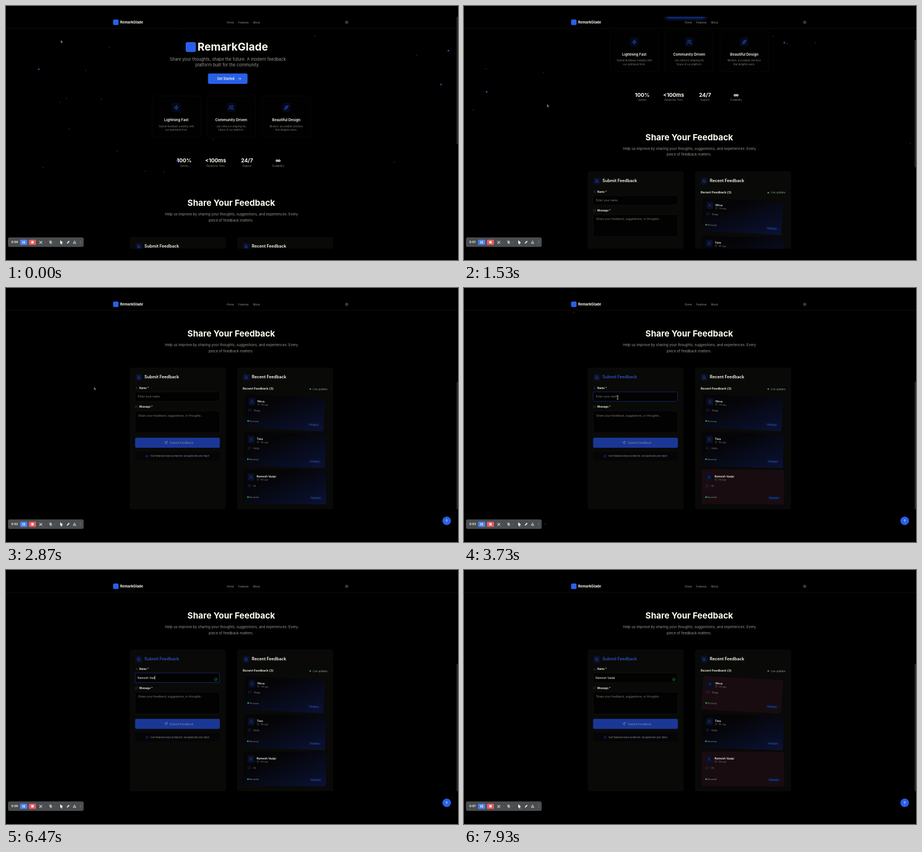
Animation, 800 px wide and 450 px high, one loop 8 s. Source, as an HTML page:

```html
<!DOCTYPE html>
<html lang="en">
<head>
<meta charset="utf-8">
<title>Feedback page</title>
<style>
html, body { margin: 0; width: 100%; height: 100%; overflow: hidden; background: #000; }
svg { display: block; width: 100vw; height: 100vh; }
text { font-family: Inter, "Open Sans", sans-serif; white-space: pre; }
</style>
</head>
<body>
<svg id="stage" viewBox="0 0 800 450"></svg>
<script>
const LOOP = 8000;
const BRIGHT = '#fcfcf0', MID = '#96968f', DIM = '#7f7f7c';
const BLUE = '#2860e8', SOFT_BLUE = '#2b56c4', NAVY = '#0a1028', GREEN = '#2fc45a';
const BRAND = 'RemarkGlade', PERSON = 'Ramesh Vadal';
const stage = document.getElementById('stage');

// Markup helpers; text is placed by its vertical middle.
const text = (x, y, s, size, fill = BRIGHT, weight = 400, anchor = 'start', extra = '') =>
  `<text x="${x}" y="${y + size * 0.36}" font-size="${size}" fill="${fill}" font-weight="${weight}" text-anchor="${anchor}" ${extra}>${s.replace('<', '&lt;')}</text>`;
const mid = (x, y, s, size, fill, weight) => text(x, y, s, size, fill, weight, 'middle');
const rect = (x, y, w, h, r, fill, extra = '') =>
  `<rect x="${x}" y="${y}" width="${w}" height="${h}" rx="${r}" fill="${fill}" ${extra}/>`;
const dot = (x, y, r, fill) => `<circle cx="${x}" cy="${y}" r="${r}" fill="${fill}"/>`;
const group = (id, body, extra = '') => `<g id="${id}" ${extra}>${body}</g>`;

const ICONS = {
  bolt: 'M13 2 3 14h9l-1 8 10-12h-9z',
  users: 'M2 21v-2a4 4 0 0 1 4-4h6a4 4 0 0 1 4 4v2M9 3a4 4 0 1 0 .1 0M22 21v-2a4 4 0 0 0-3-4M16 3a4 4 0 0 1 0 8',
  spark: 'M12 4l2 6 6 2-6 2-2 6-2-6-6-2 6-2zM19 2v5M16.500 4.500h5M5 17v4M3 19h4',
  user: 'M12 3a4 4 0 1 0 .1 0M4 21a8 8 0 0 1 16 0',
  chat: 'M3 4h18v13H8l-5 4z',
  clock: 'M12 2a10 10 0 1 0 .1 0M12 6v6l4 2',
  send: 'M22 2 2 9l8 4 4 9zM22 2 10 13',
  check: 'M12 2a10 10 0 1 0 .1 0M7 12l4 4 6-8',
  right: 'M3 12h18M14 5l7 7-7 7',
  up: 'M12 21V3M5 10l7-7 7 7',
  sun: 'M12 7a5 5 0 1 0 .1 0M12 1v3M12 20v3M1 12h3M20 12h3M4 4l2 2M18 18l2 2M4 20l2-2M18 6l2-2',
  page: 'M6 2h9l5 5v15H6zM9 12h7M9 17h7',
  off: 'M5 18 17 5l3 3L8 20zM3 4l18 18',
  mic: 'M12 2v11M8 4v7a4 4 0 0 0 8 0V4M5 11a7 7 0 0 0 14 0M12 18v4M4 4l17 17',
  down: 'M5 9l7 7 7-7',
  pen: 'M4 20l2-6L17 3l4 4L10 18z',
  mark: 'M3 21h18L12 3zM8 15h8'
};
const icon = (name, x, y, size, color, w = 2, fill = 'none') =>
  `<path transform="translate(${x - size / 2} ${y - size / 2}) scale(${size / 24})" d="${ICONS[name]}" fill="${fill}" stroke="${color}" stroke-width="${w}" stroke-linecap="round" stroke-linejoin="round"/>`;

const FIELD_LINE = 'stroke="#191916" stroke-width=".5"';
const panel = x => rect(x, 409, 170, 251, 4, '#090907');

function hero() {
  const features = [
    [301.5, 'bolt', 'Lightning Fast', 'Submit feedback instantly with', 'our optimized form.'],
    [398.5, 'users', 'Community Driven', 'Join others in shaping the', 'future of our platform.'],
    [496, 'spark', 'Beautiful Design', 'Modern, accessible interface', 'that delights users.']
  ];
  const stats = [[315.5, '100%', 'Uptime'], [371, '<100ms', 'Response Time'],
    [426.5, '24/7', 'Support'], [481.5, '∞', 'Scalability']];
  return rect(318, 64, 18, 17.5, 3, BLUE) + text(339, 72.5, BRAND, 19, BRIGHT, 700) +
    mid(392.5, 94.2, 'Share your thoughts, shape the future. A modern feedback', 7.4, MID) +
    mid(392, 104.4, 'platform built for the community.', 7.4, MID) +
    rect(357.5, 119.5, 70, 18.5, 3, BLUE) +
    text(374, 128.8, 'Get Started', 5.5, BRIGHT, 600) + icon('right', 413.5, 128.8, 5.5, BRIGHT, 2.6) +
    features.map(([x, ico, title, a, b]) =>
      rect(x - 43, 159.5, 86, 73, 3, '#010101', 'stroke="#0e0e0d" stroke-width=".6"') +
      rect(x - 8, 171, 16, 17, 4, '#050816') + icon(ico, x, 180, 9.5, BLUE) +
      mid(x, 202, title, 6.3, BRIGHT, 600) + mid(x, 213, a, 4.3, DIM) + mid(x, 219.6, b, 4.3, DIM)).join('') +
    stats.map(([x, v, l]) => mid(x, 274, v, 9.4, BRIGHT, 700) + mid(x, 283, l, 4.4, DIM)).join('') +
    mid(398.7, 349, 'Share Your Feedback', 15, BRIGHT, 700) +
    mid(399, 369, 'Help us improve by sharing your thoughts, suggestions, and experiences. Every', 6.26, MID) +
    mid(398.5, 379.3, 'piece of feedback matters.', 6.26, MID);
}

function formCard() {
  return panel(219) +
    rect(229, 420, 12, 12.5, 3, NAVY) + icon('page', 235, 426, 6, SOFT_BLUE) +
    text(245, 425.7, 'Submit Feedback', 7.3, BRIGHT, 600, 'start', 'id="formTitle"') +
    group('fields',
      icon('user', 231, 445.3, 4.5, '#3a5c9c') + text(236, 445.3, 'Name *', 4.6, BRIGHT, 600) +
      rect(228.5, 452, 149.5, 16.8, 2, '#020202', 'id="nameBox" ' + FIELD_LINE) +
      text(233.5, 460.3, 'Enter your name', 5, DIM, 400, 'start', 'id="hint"') +
      text(233, 460.3, '', 5.1, BRIGHT, 400, 'start', 'id="typed"') +
      rect(0, 457.2, 0.7, 6.2, 0, BRIGHT, 'id="caret"') +
      group('ok', icon('check', 371.5, 463.5, 6, GREEN)) +
      icon('chat', 231, 478.7, 4.5, '#3a5c9c') + text(236, 478.7, 'Message *', 4.5, BRIGHT, 600) +
      rect(228.5, 485.8, 149.5, 38.5, 2, '#020202', FIELD_LINE) +
      text(234, 493.8, 'Share your feedback, suggestions, or thoughts...', 5, DIM) +
      group('send',
        rect(228.5, 533.2, 150, 17.8, 2.5, '#1b3796') +
        icon('send', 283, 542, 6, '#8c98b4') + text(290, 542.3, 'Submit Feedback', 5.05, '#828ca8') +
        rect(228.5, 558, 150, 15.5, 2, '#050507') +
        icon('check', 249.5, 566, 5, SOFT_BLUE) +
        mid(307.5, 566, 'Your feedback helps us improve. We appreciate your input!', 3.75, MID)));
}

function entry(i, x, y, angle, scale, name, msg) {
  const box = fill => rect(-73, -30.5, 146, 61, 2.5, fill);
  return `<g transform="translate(${x} ${y}) rotate(${angle}) scale(${scale})">` + box('url(#dusk)') +
    group('warm' + i, box('#190c11')) +
    rect(-66, -23.5, 12, 13, 3, NAVY) + icon('user', -60, -17, 6, SOFT_BLUE) +
    text(-50, -18.5, name, 5, BRIGHT, 600) +
    icon('clock', -48, -12.7, 4, DIM) + text(-43.5, -12.7, '10h ago', 3.8, DIM) +
    icon('chat', -62.5, -1.5, 5.5, '#2d4684') + text(-56, -1.5, msg, 4.6, DIM) +
    dot(-65, 18.5, 1.4, GREEN) + text(-62.5, 18.5, 'Received', 3.8, MID) +
    rect(44, 16, 22, 6, 3, '#0c1638') + mid(55, 19, 'Feedback', 3.6, '#3a6ce0') + '</g>';
}

function listCard() {
  return panel(409) +
    rect(419, 420, 12, 12.5, 3, NAVY) + icon('page', 425, 426, 6, SOFT_BLUE) +
    text(435, 425.7, 'Recent Feedback', 7.3, BRIGHT, 600) +
    text(419, 446.5, 'Recent Feedback (3)', 5.45, BRIGHT, 600) +
    dot(538.5, 447, 1.3, GREEN) + text(543, 447, 'Live updates', 4.3, MID) +
    entry(1, 492.5, 489, 3, 0.97, 'Nirva', 'Sleep') +
    entry(2, 493, 555, 1.7, 0.99, 'Tara', 'Hello') +
    entry(3, 493.5, 620.5, 0.4, 1, PERSON, 'Hi');
}

function header() {
  return rect(0, 19, 800, 21, 0, '#000') +
    `<g clip-path="url(#barClip)">${rect(357.5, 0, 70, 18.5, 3, '#173a9c', 'id="barGlow" filter="url(#soft)"')}</g>` +
    '<path d="M0 39.5H800" stroke="#161614" stroke-width=".6"/>' +
    rect(189.5, 24, 9.7, 9.7, 2, BLUE) +
    text(202, 29, BRAND, 6.2, BRIGHT, 700) +
    text(391, 29, 'Home', 4.5, MID) + text(411, 29, 'Features', 4.5, MID) + text(437, 29, 'About', 4.5, MID) +
    icon('sun', 603, 29, 6, '#b4b4ac');
}

function toolbar() {
  return rect(4, 410.5, 133, 15.8, 2, '#4a4d50', 'stroke="#62666a" stroke-width=".6"') +
    text(9.5, 418.5, '0:00', 5, BRIGHT, 700, 'start', 'id="clock"') +
    rect(25, 414, 12.5, 9.2, 1.5, '#4b82f0') + rect(29.3, 416.5, 1.3, 4.2, 0, BRIGHT) + rect(32, 416.5, 1.3, 4.2, 0, BRIGHT) +
    rect(40.5, 414, 12.5, 9.2, 1.5, '#ea5a62') + rect(44.8, 416.6, 4, 4, 0.6, BRIGHT) +
    icon('off', 61.5, 418.5, 7, BRIGHT, 2.6) + icon('down', 69.5, 418.5, 3, '#b4b4b4') +
    icon('mic', 79, 418.5, 7, BRIGHT) + icon('down', 86, 418.5, 3, '#b4b4b4') +
    `<path d="M96 415l5 4.500-2.600.2 1.200 2.400-1.200.6-1.100-2.500-1.300 1.500z" fill="${BRIGHT}"/>` +
    icon('pen', 110, 418.5, 6, BRIGHT, 2, BRIGHT) + icon('mark', 121.5, 418.5, 6, BRIGHT, 2.5) +
    [416, 418.5, 421].map(y => dot(132, y, 0.6, '#a0a0a0')).join('');
}

// Background specks: visible span, then x,y pairs; "!" marks a large one.
const SPECKS = [
  [-900, 1150, '58,112,! 183,74 141,114 169,165 112,218 197,257 246,293 279,294 303,274,! 547,53 783,79,! 770,139,! 727,87 687,277 96,171 107,164 66,286 305,40 367,236'],
  [900, 2000, '39,111 40,152,! 141,118 16,184 268,46,! 296,55 567,65,! 572,67 622,65 547,54 790,243'],
  [1700, 2700, '481,107 119,228 791,244'],
  [3000, 4400, '194,43 144,418'],
  [4700, 5700, '303,42']
];
const speckles = ([, , points], i) => group('specks' + i, points.split(' ').map(p => {
  const [x, y, large] = p.split(',');
  return large ? dot(x, y, 1.5, SOFT_BLUE) : dot(x, y, 0.8, '#3c4763');
}).join(''));

stage.innerHTML = `<defs>
  <clipPath id="view"><rect y="19" width="800" height="411"/></clipPath>
  <clipPath id="barClip"><rect y="19" width="800" height="20"/></clipPath>
  <filter id="soft" x="-20%" y="-80%" width="140%" height="260%"><feGaussianBlur stdDeviation="3"/></filter>
  <linearGradient id="dusk" x1="0" y1="0" x2="1" y2="1"><stop offset=".3" stop-color="#050508"/><stop offset="1" stop-color="#0b1234"/></linearGradient>
</defs>` + rect(0, 0, 800, 450, 0, '#000') +
  group('screen',
    SPECKS.map(speckles).join('') +
    group('page', hero() + formCard() + listCard()) + header() +
    rect(797.5, 19, 2.5, 226, 1, '#2a2a2a', 'id="thumb"') +
    group('top', dot(780, 412.5, 7.6, BLUE) + icon('up', 780, 412.5, 6, BRIGHT, 2.4)),
    'clip-path="url(#view)"') +
  toolbar() +
  group('arrow', '<path d="M0 0v5l1.200-1 1 2 .9-.5-1-2h1.600z" fill="#8a8a86" stroke="#222" stroke-width=".2"/>') +
  group('beam', '<path d="M-1.500-3h3M0-3v6M-1.500 3h3" fill="none" stroke="#c8c8c0" stroke-width=".8"/>');

const el = {};
stage.querySelectorAll('[id]').forEach(n => { el[n.id] = n; });
const set = (id, name, value) => el[id].setAttribute(name, value);
const show = (id, on) => set(id, 'opacity', +on);
const clamp = v => Math.max(0, Math.min(1, v));
const ease = (t, a, b) => { const u = clamp((t - a) / (b - a)); return u * u * (3 - 2 * u); };
const within = (t, a, b) => t >= a && t < b;

const SCROLL = [[800, 0], [1530, 116], [2200, 195.5], [2700, 268]];
function scrollAt(t) {
  let y = 0;
  for (let i = 1; i < SCROLL.length; i++) {
    const [a, from] = SCROLL[i - 1], [b, to] = SCROLL[i];
    y += (to - from) * clamp((t - a) / (b - a));
  }
  return y;
}

function draw(t) {
  const s = scrollAt(t);
  set('page', 'transform', `translate(0 ${-s})`);
  set('barGlow', 'y', 119.5 - s);
  show('barGlow', within(s, 80, 128));
  set('thumb', 'y', 19 + 0.2 * s + 0.0013 * s * s);
  set('top', 'opacity', clamp((s - 145) / 20));
  set('send', 'opacity', ease(t, 1600, 2000));
  SPECKS.forEach(([a, b], i) => set('specks' + i, 'opacity', clamp(Math.min(t - a, b - t) / 300)));

  const go = ease(t, 70, 870), over = ease(t, 2750, 3500);
  const x = 97 + 50 * go + 125 * over, y = 60.5 + 113.5 * go + 20 * over;
  const onInput = over > 0.93;
  set('arrow', 'transform', `translate(${x} ${y})`);
  set('beam', 'transform', `translate(${x} ${y})`);
  show('arrow', !onInput);
  show('beam', onInput && t < 5040);

  const focus = within(t, 4300, 7350), hover = onInput && t < 4300;
  const count = t < 5040 ? 0 : Math.min(PERSON.length, Math.max(1, Math.floor(1 + (t - 5180) / 140)));
  set('formTitle', 'fill', over > 0.8 ? SOFT_BLUE : BRIGHT);
  set('fields', 'transform', `translate(0 ${-1.5 * ease(t, 4300, 4500)})`);
  set('nameBox', 'stroke', focus || hover ? '#14225c' : '#191916');
  set('nameBox', 'stroke-width', focus ? 1.2 : hover ? 1 : 0.5);
  el.typed.textContent = PERSON.slice(0, count);
  show('hint', !count);
  show('ok', count > 0);
  set('caret', 'x', 233.4 + (count ? el.typed.getComputedTextLength() : 0));
  show('caret', focus && (within(t, 5040, 6800) || t % 1000 < 500));

  show('warm1', t >= 7400);
  show('warm2', false);
  show('warm3', within(t, 3530, 4400) || t >= 6530);
  el.clock.textContent = '0:0' + Math.floor(t / 1000);
}

const start = performance.now();
function tick() {
  draw((performance.now() - start) % LOOP);
  requestAnimationFrame(tick);
}
tick();
</script>
</body>
</html>
```
